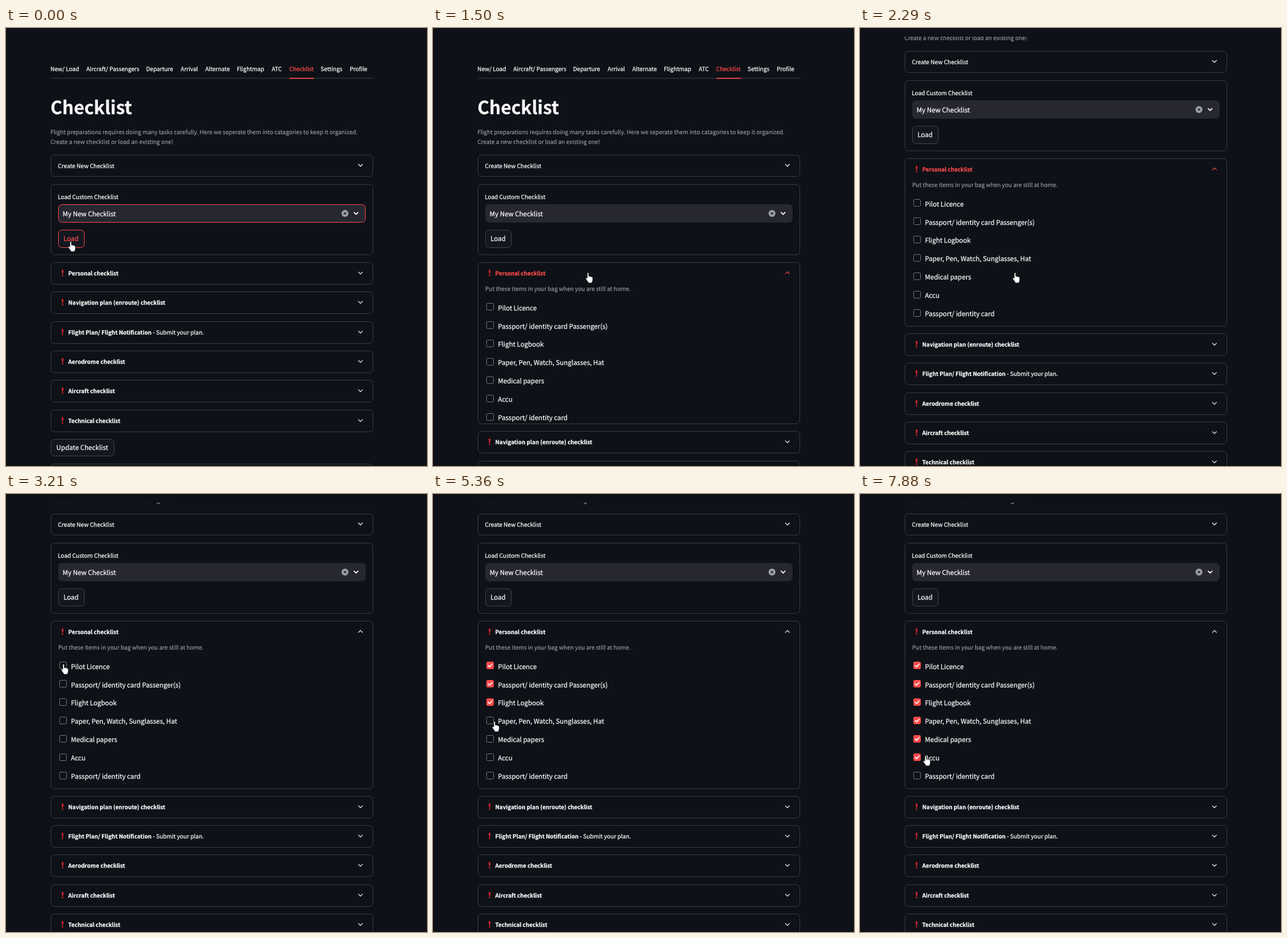
Write an HTML page that moves like this. It is 734 by 763 pixels and loops after 8000 ms.

```html
<!DOCTYPE html>
<html lang="en">
<head>
<meta charset="utf-8">
<title>Checklist</title>
<style>
  html, body { margin: 0; width: 100%; height: 100%; overflow: hidden; background: #0e1117; }
  svg { display: block; width: 734px; height: 763px; }
  text {
    font: 10.03px 'Noto Sans CJK JP', 'Noto Sans CJK SC', 'Noto Sans CJK', 'Noto Sans', sans-serif;
    color: #fafafa; fill: currentColor; stroke: currentColor; stroke-width: .25;
    white-space: pre; text-rendering: geometricPrecision;
  }
  .body { font-size: 11.46px; }
  .title { font-size: 31.5px; font-weight: 700; }
  .strong { font-size: 9.8px; font-weight: 700; }
  .plain { font-size: 10.03px; font-weight: 400; }
  .muted { color: #9b9da1; stroke-width: .15; }
  .active { color: #ff4b4b; }
  .card { fill: none; stroke: #3a3d43; }
  .button { fill: #131720; stroke: #41444c; }
  .chevron { fill: none; stroke: #fafafa; stroke-width: 1.3; stroke-linecap: round; stroke-linejoin: round; }
  .select { fill: #262730; stroke: #262730; }
  .box { fill: #0e1117; stroke: #73757a; }
  .tick { fill: none; stroke: #fff; stroke-width: 1.7; stroke-linecap: round; stroke-linejoin: round; visibility: hidden; }
  .checked .box { fill: #ff4b4b; stroke: #ff4b4b; }
  .checked .tick { visibility: visible; }
  .hot .strong, .hot .label { color: #ff4b4b; }
  .hot .chevron, .hot .button, .focus { stroke: #ff4b4b; }
</style>
</head>
<body>
<svg id="stage" viewBox="0 0 734 763"></svg>
<script>
const LOOP = 8000, OPEN_SIZE = 253.6, LIST_TOP = 408.05, PITCH = 51.3;

const tabs = [
  ['New/ Load', 77.4], ['Aircraft/ Passengers', 140], ['Departure', 244.2], ['Arrival', 304.6],
  ['Alternate', 347.5], ['Flightmap', 402.4], ['ATC', 463.2], ['Checklist', 493.8],
  ['Settings', 548.6], ['Profile', 599.2]
];
const sections = [
  'Navigation plan (enroute) checklist',
  'Flight Plan/ Flight Notification<tspan class="plain"> - Submit your plan.</tspan>',
  'Aerodrome checklist', 'Aircraft checklist', 'Technical checklist'
];
const items = [
  'Pilot Licence', 'Passport/ identity card Passenger(s)', 'Flight Logbook',
  'Paper, Pen, Watch, Sunglasses, Hat', 'Medical papers', 'Accu', 'Passport/ identity card'
];

// Bursts of screen updates: start, end, number of steps
const bursts = [
  [550, 1500, 8], [1640, 2560, 8], [2690, 3620, 8], [3770, 4210, 4],
  [4480, 4620, 2], [4910, 5780, 7], [6180, 7190, 8], [7350, 7880, 5]
];
// Pointer moves: start, end, x, y
const moves = [
  [450, 1229, 266, 426], [2600, 3221, 96, 296], [3700, 4063, 97, 334], [4400, 4620, 96.5, 362.5],
  [4980, 5345, 103, 396], [5550, 5780, 102.5, 423.5], [6250, 6750, 127, 461.5], [6850, 7190, 110, 455.5]
];
const scrollStops = [
  [1640, 0], [1771, 2], [1903, 20], [2034, 65.4], [2166, 135], [2297, 181], [2429, 186.5], [2560, 187.2]
];
const checkTimes = [3600, 4900, 5190, 5480, 6170, 7470];

const text = (x, y, s, cls = '') => `<text x="${x}" y="${y}" class="${cls}">${s}</text>`;
const rect = (x, y, w, h, cls, rx = 6, id = '') =>
  `<rect x="${x}" y="${y}" width="${w}" height="${h}" rx="${rx}" class="${cls}" id="${id}"/>`;
const card = (y, h, id = '') => rect(78.5, y, 561, h, 'card', 6, id);
const chevron = (y, id = '') => `<path id="${id}" class="chevron" d="M614.5 ${y - 1.7}l3.5 3.5 3.5-3.5"/>`;
const alertMark = y =>
  `<path fill="#e0262f" d="M97 ${y - 5.2}q1.6-1 3.2 0l-.8 7h-1.6z"/><circle cx="98.6" cy="${y + 4}" r="1.3" fill="#e0262f"/>`;

const expander = (top, label, cardId = '', arrowId = '') =>
  card(top + .5, 38, cardId) + alertMark(top + 19) + text(108.5, top + 23, label, 'strong') +
  chevron(top + 18.8, arrowId);

function item(label, i) {
  const y = 479.5 + 32 * i;
  return `<g class="item">${rect(93.5, y, 12, 12, 'box', 1.8)}
    <path class="tick" d="M96.2 ${y + 6.2}l2.4 2.5 4.5-5"/>
    ${text(113.3, Math.round(491.6 + 31.9 * i), label, 'body')}</g>`;
}

document.getElementById('stage').innerHTML = `
  <clipPath id="reveal"><rect id="revealBox" x="78" y="446" width="562" height="0"/></clipPath>
  <g id="page">
    ${tabs.map(([s, x]) => text(x, 75, s, s === 'Checklist' ? 'active' : '')).join('')}
    <rect x="78" y="86.8" width="562" height="1.6" fill="#2b2d35"/>
    <rect x="494" y="86.8" width="43" height="1.7" fill="#ff4b4b"/>
    ${text(77.4, 150, 'Checklist', 'title')}
    ${text(77.4, 185, 'Flight preparations requires doing many tasks carefully. Here we seperate them into catagories to keep it organized.', 'muted')}
    ${text(77.4, 202.4, 'Create a new checklist or load an existing one!', 'muted')}
    ${card(221.5, 37)}${text(90.6, 244, 'Create New Checklist')}${chevron(239.2)}
    ${card(272.5, 122.5)}${text(90.2, 298, 'Load Custom Checklist')}
    ${rect(91.5, 307.5, 535, 31, 'select', 6, 'select')}
    ${text(98.8, 327.5, 'My New Checklist', 'body')}
    <circle cx="591" cy="323" r="6" fill="#a0a2a8"/>
    <path d="M588.9 320.9l4.2 4.2m0-4.2l-4.2 4.2" stroke="#262730" stroke-width="1.4"/>
    <path class="chevron" style="stroke-width:1.8" d="M607 321.3l3.4 3.4 3.4-3.4"/>
    <g id="load">${rect(91.5, 352, 45, 30.5, 'button')}${text(100.2, 371, 'Load', 'body label')}</g>
    <g id="personal">${expander(408, 'Personal checklist', 'personalCard', 'arrow')}</g>
    <g clip-path="url(#reveal)">
      ${text(91, 458, 'Put these items in your bag when you are still at home.', 'muted')}
      ${items.map(item).join('')}
    </g>
  </g>
  ${sections.map(s => `<g class="row">${expander(0, s)}</g>`).join('')}
  <g class="row">
    ${rect(78.5, .5, 110, 29, 'button')}${text(87.8, 19, 'Update Checklist', 'body')}
    ${card(43.5, 38)}
  </g>
  <rect width="734" height="15" fill="#0e1117"/>
  <path id="pointer" fill="#fff" stroke="#14161b" stroke-width=".8" stroke-linejoin="round"
    d="M3 10V1.6a1.3 1.3 0 0 1 2.6 0V6.4q3.2 0 4 .9 2.7 0 2.9 2.2v3.5q0 2-1.2 3.2v1.9H4.4V16.4Q2 13.8.4 11q-.6-1.6.8-2t1.8 1z"/>`;

const parts = Object.fromEntries(
  ['page', 'select', 'load', 'personal', 'personalCard', 'arrow', 'revealBox', 'pointer']
    .map(id => [id, document.getElementById(id)]));
const checks = [...document.querySelectorAll('.item')];
const rows = [...document.querySelectorAll('.row')];
const clamp = v => Math.max(0, Math.min(1, v));
const shift = (node, x, y) => node.setAttribute('transform', `translate(${x} ${y})`);

function stepTime(t) {
  let held = 0;
  for (const [start, end, count] of bursts) {
    if (t < start) break;
    const gap = (end - start) / (count - 1);
    const n = Math.min(count - 1, Math.floor((t - start + 15) / gap));
    held = start + n * gap;
  }
  return held;
}

function pointerAt(t) {
  let x = 108.5, y = 371.5;
  for (const [start, end, toX, toY] of moves) {
    const u = clamp((t - start) / (end - start)), k = u * u * (3 - 2 * u);
    x += (toX - x) * k;
    y += (toY - y) * k;
  }
  return [x, y];
}

function scrollAt(t) {
  let y = 0;
  scrollStops.forEach(([at, to], i) => {
    const [from, base] = scrollStops[i - 1] || [0, 0];
    if (t > from) y = base + (to - base) * clamp((t - from) / (at - from));
  });
  return y;
}

function draw(now) {
  const t = stepTime(now % LOOP);
  const opened = t > 1265;
  const size = OPEN_SIZE * (1 - (1 - clamp((t - 1265) / 500)) ** 5);
  const scroll = scrollAt(t);

  // Blocks snap to whole pixels on their own, as page boxes do
  shift(parts.page, 0, -Math.round(scroll));
  rows.forEach((row, i) => shift(row, 0, Math.round(LIST_TOP + PITCH * (i + 1) + size - scroll)));
  shift(parts.pointer, ...pointerAt(t));
  parts.personalCard.setAttribute('height', 38 + Math.round(size));
  parts.revealBox.setAttribute('height', size);
  parts.arrow.setAttribute('transform', opened ? 'matrix(1 0 0 -1 0 853.2)' : '');
  parts.select.classList.toggle('focus', t < 550);
  parts.load.classList.toggle('hot', t < 680);
  parts.personal.classList.toggle('hot', t > 1080 && t < 2420);
  checks.forEach((check, i) => check.classList.toggle('checked', t >= checkTimes[i]));
}

const began = performance.now();
function tick() {
  draw(performance.now() - began);
  requestAnimationFrame(tick);
}
tick();
</script>
</body>
</html>
```
